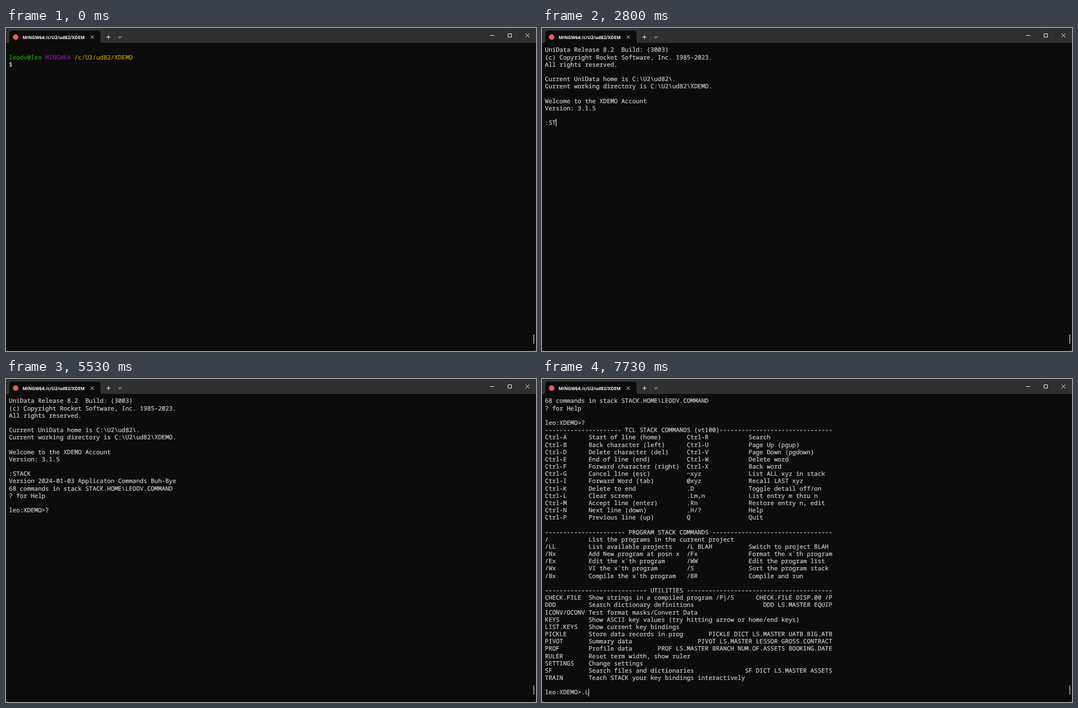
These frames come from a looping animation (959x584 px, 8 s). An HTML page:

```html
<!DOCTYPE html>
<html lang="en">
<head>
<meta charset="utf-8">
<title>Terminal session</title>
<style>
  html, body { margin: 0; width: 100%; height: 100%; overflow: hidden; background: #0c0c0c; }
  svg { display: block; width: 100%; height: 100%; }
  .term { color: #ccc; }
  .term text {
    font: 500 10.97px "Noto Sans Mono", "DejaVu Sans Mono", monospace;
    fill: currentColor; stroke: currentColor; stroke-width: .22;
    white-space: pre; text-rendering: geometricPrecision;
    font-variant-ligatures: none;
  }
  .title { font: 700 8px "Open Sans", "Noto Sans", sans-serif; fill: #fff; text-rendering: geometricPrecision; }
  .icons { fill: none; stroke: #f2f2f2; stroke-width: 1; }
</style>
</head>
<body>
<svg viewBox="0 0 959 584" xmlns="http://www.w3.org/2000/svg">
  <rect width="959" height="584" fill="#303030"/>
  <path d="M0 27H959V579a5 5 0 0 1 -5 5H5a5 5 0 0 1 -5 -5Z" fill="#0c0c0c"/>
  <path d="M2 27.5a4 4 0 0 0 4 -4V10a5 5 0 0 1 5 -5H166a5 5 0 0 1 5 5V23.5a4 4 0 0 0 4 4Z" fill="#0c0c0c"/>
  <circle cx="17.5" cy="16.5" r="5" fill="#e2614f"/>
  <text class="title" x="30" y="19.6">MINGW64:/c/U2/ud82/XDEM</text>
  <path d="M196.5 10V23" stroke="#3c3c3c"/>
  <g class="icons">
    <path d="M153 13.5l6 6m0 -6l-6 6"/>
    <path d="M181.5 16.5h7.5M185.3 12.8v7.5"/>
    <path d="M203.3 15.3l2.7 2.7l2.7 -2.7"/>
    <path d="M876 13.5h7.5"/>
    <rect x="908.5" y="10.5" width="6" height="6"/>
    <path d="M940 10l7 7m0 -7l-7 7"/>
  </g>
  <rect x="954" y="554" width="2" height="17" rx="1" fill="#8c8c8c"/>
  <g class="term">
    <g id="rows"></g>
    <text id="shell"><tspan color="#13a10e">leodv@leo</tspan> <tspan color="#881798">MINGW64</tspan> <tspan color="#c19c00">/c/U2/ud82/XDEMO</tspan></text>
    <rect id="caret" width="1" height="14" fill="#fff"/>
  </g>
</svg>
<script>
const LOOP = 8000, ROWS = 41, COLS = 79;
const CELL_W = 6.582, CELL_H = 13.175, LEFT = 5.3, TOP = 32.65, ASCENT = 10.8;
const PROMPT = "leo:XDEMO>";

const heading = (before, label, after) => "-".repeat(before) + label + "-".repeat(after);
const entry = (key, text, key2 = "", text2 = "") =>
  key.padEnd(12) + text.padEnd(27) + key2.padEnd(17) + text2;
const utility = (key, text, example = "") => {
  const head = key.padEnd(12) + text;
  return head + example.padStart(COLS - head.length);
};

const log = [
  "UniData Release 8.2  Build: (3003)",
  "(c) Copyright Rocket Software, Inc. 1985-2023.",
  "All rights reserved.",
  "",
  "Current UniData home is C:\\U2\\ud82\\.",
  "Current working directory is C:\\U2\\ud82\\XDEMO.",
  "",
  "Welcome to the XDEMO Account",
  "Version: 3.1.5",
  "",
  ":STACK",
  "Version 2024-01-03 Applicaton Commands Buh-Bye",
  "68 commands in stack STACK.HOME\\LEODV.COMMAND",
  "? for Help",
  "",
  PROMPT + "?",
  heading(21, " TCL STACK COMMANDS (vt100)", 31),
  entry("Ctrl-A", "Start of line (home)", "Ctrl-R", "Search"),
  entry("Ctrl-B", "Back character (left)", "Ctrl-U", "Page Up (pgup)"),
  entry("Ctrl-D", "Delete character (del)", "Ctrl-V", "Page Down (pgdown)"),
  entry("Ctrl-E", "End of line (end)", "Ctrl-W", "Delete word"),
  entry("Ctrl-F", "Forward character (right)", "Ctrl-X", "Back word"),
  entry("Ctrl-G", "Cancel line (esc)", "~xyz", "List ALL xyz in stack"),
  entry("Ctrl-I", "Forward Word (tab)", "@xyz", "Recall LAST xyz"),
  entry("Ctrl-K", "Delete to end", ".D", "Toggle detail off/on"),
  entry("Ctrl-L", "Clear screen", ".Lm,n", "List entry m thru n"),
  entry("Ctrl-M", "Accept line (enter)", ".Rn", "Restore entry n, edit"),
  entry("Ctrl-N", "Next line (down)", ".H/?", "Help"),
  entry("Ctrl-P", "Previous line (up)", "Q", "Quit"),
  "",
  heading(22, " PROGRAM STACK COMMANDS ", 33),
  entry("/", "List the programs in the current project"),
  entry("/LL", "List available projects", "/L BLAH", "Switch to project BLAH"),
  entry("/Nx", "Add New program at posn x", "/Fx", "Format the x`th program"),
  entry("/Ex", "Edit the x`th program", "/WW", "Edit the program list"),
  entry("/Wx", "VI the x`th program", "/S", "Sort the program stack"),
  entry("/Bx", "Compile the x`th program", "/BR", "Compile and run"),
  "",
  heading(28, " UTILITIES ", 40),
  utility("CHECK.FILE", "Show strings in a compiled program /P|/S", "CHECK.FILE DISP.00 /P"),
  utility("DDD", "Search dictionary definitions", "DDD LS.MASTER EQUIP"),
  utility("ICONV/OCONV", "Test format masks/Convert Data"),
  utility("KEYS", "Show ASCII key values (try hitting arrow or home/end keys)"),
  utility("LIST.KEYS", "Show current key bindings"),
  utility("PICKLE", "Store data records in prog", "PICKLE DICT LS.MASTER UATB.BIG.ATB"),
  utility("PIVOT", "Summary data", "PIVOT LS.MASTER LESSOR GROSS.CONTRACT"),
  utility("PROF", "Profile data", "PROF LS.MASTER BRANCH NUM.OF.ASSETS BOOKING.DATE"),
  utility("RULER", "Reset term width, show ruler"),
  utility("SETTINGS", "Change settings"),
  utility("SF", "Search files and dictionaries", "SF DICT LS.MASTER ASSETS"),
  utility("TRAIN", "Teach STACK your key bindings interactively"),
  ""
];

// [time, finished lines above, prompt, key times, typed text]
const SHELL_END = 1670;
const steps = [
  [0, 2, "$ ", [1200, 1270, 1470], "udt"],
  [SHELL_END, 0, "", [], ""],
  [1730, 6, "", [], ""],
  [1800, 10, ":", [2670, 2800, 3000, 3200, 3400], "STACK"],
  [3730, 12, "", [], ""],
  [3870, 15, PROMPT, [4870], "?"],
  [6000, 51, "", [], ""],
  [6070, 52, PROMPT, [7530, 7730], ".L"]
];
const caretOn = [[200, 800], [1130, 2270], [2600, 4400], [4730, 5530], [6000, 6670], [7270, LOOP]];

const $ = id => document.getElementById(id);
const shell = $("shell"), caret = $("caret");
const place = (el, row) => {
  el.setAttribute("x", LEFT);
  el.setAttribute("y", TOP + row * CELL_H + ASCENT);
};
const rows = Array.from({ length: ROWS }, (_, i) => {
  const el = document.createElementNS("http://www.w3.org/2000/svg", "text");
  place(el, i);
  return $("rows").appendChild(el);
});
place(shell, 1);

function draw(t) {
  const inShell = t < SHELL_END;
  const [, above, prompt, keys, typed] = steps.findLast(s => s[0] <= t);
  const active = prompt + typed.slice(0, keys.filter(k => k <= t).length);
  const scroll = Math.max(0, above + 1 - ROWS);

  rows.forEach((el, i) => {
    const n = i + scroll;
    const text = n === above ? active : n < above && !inShell ? log[n] : "";
    if (el.textContent !== text) el.textContent = text;
  });
  shell.style.display = inShell ? "" : "none";

  caret.style.display = caretOn.some(([a, b]) => t >= a && t < b) ? "" : "none";
  caret.setAttribute("x", Math.round(LEFT + active.length * CELL_W));
  caret.setAttribute("y", Math.round(TOP + (above - scroll) * CELL_H));
}

function tick() {
  draw(performance.now() % LOOP);
  requestAnimationFrame(tick);
}
tick();
</script>
</body>
</html>
```
